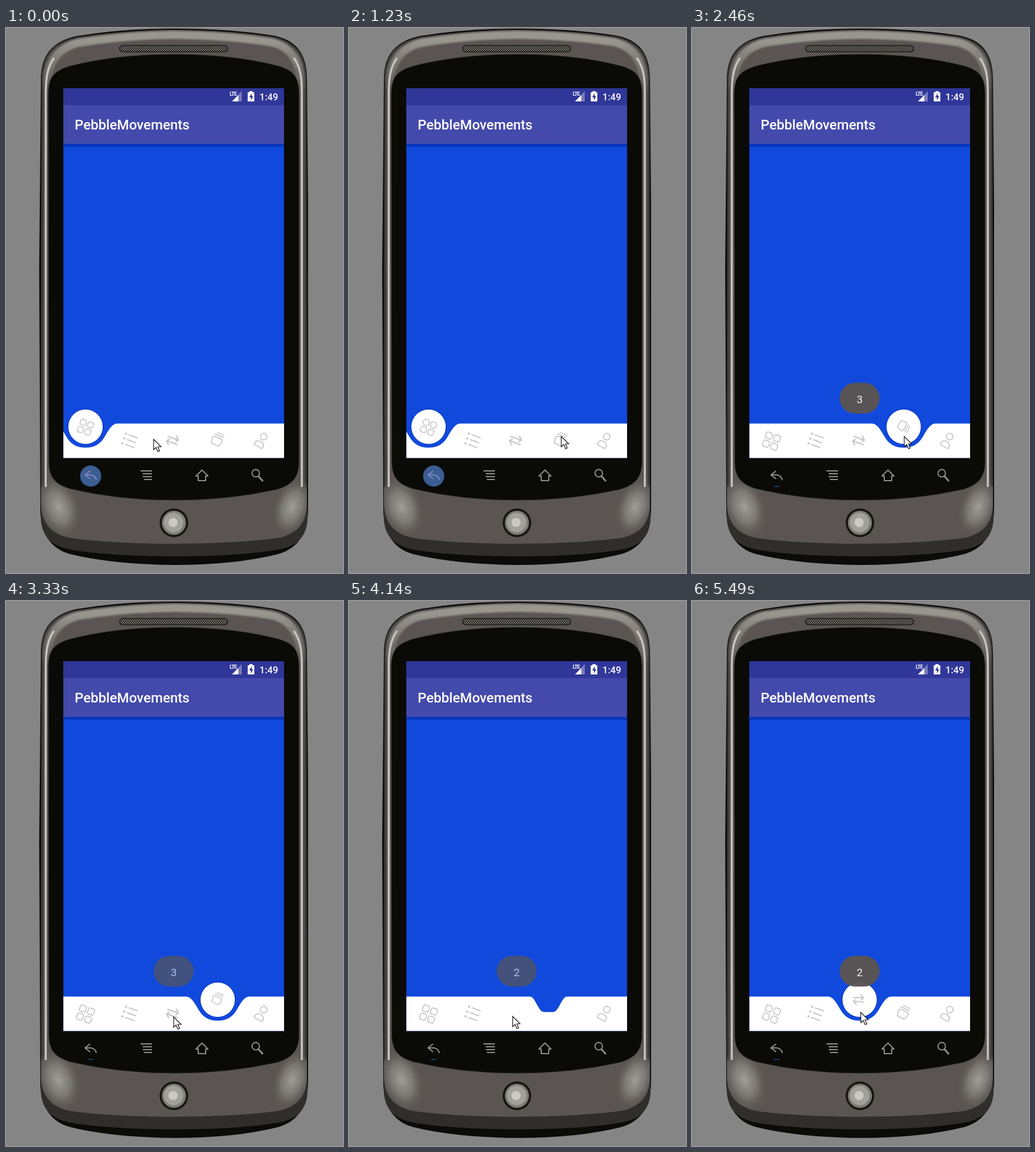
Write an HTML page that moves like this. It is 589 px wide and 950 px high and loops after 5.52 s.

```html
<!DOCTYPE html>
<html lang="en">
<head>
<meta charset="utf-8">
<title>Sliding notch menu</title>
<style>
html, body { margin: 0; width: 100%; height: 100%; overflow: hidden; background: #858585; }
svg { display: block; width: 589px; height: 950px; font-family: Roboto, sans-serif; }
.line { fill: none; stroke: #c9c9c9; stroke-width: 1.9; stroke-linecap: round; stroke-linejoin: round; }
.key { fill: none; stroke: #918f8a; stroke-width: 2; stroke-linejoin: round; }
</style>
</head>
<body>
<svg viewBox="0 0 589 950">
  <defs>
    <radialGradient id="shine">
      <stop offset="0" stop-color="#a19f99"/>
      <stop offset=".5" stop-color="#8a8883" stop-opacity=".7"/>
      <stop offset="1" stop-color="#5a5552" stop-opacity="0"/>
    </radialGradient>
    <linearGradient id="topLight" x1="0" y1="0" x2="0" y2="110" gradientUnits="userSpaceOnUse">
      <stop offset=".2" stop-color="#98968f"/>
      <stop offset="1" stop-color="#98968f" stop-opacity="0"/>
    </linearGradient>
    <filter id="soft" x="-10%" y="-10%" width="120%" height="120%"><feGaussianBlur stdDeviation="1.500"/></filter>
    <pattern id="mesh" width="4" height="4" patternUnits="userSpaceOnUse">
      <rect width="4" height="4" fill="#22211e"/>
      <path d="M0 0h2v2H0zM2 2h2v2H2z" fill="#77746f"/>
    </pattern>
    <clipPath id="body"><path d="M62 90C62 48 82 24 124 16Q205 4 294 3Q390 4 466 15C508 23 525 48 525 90L526 830C526 862 510 882 476 889Q400 899 294 899Q184 899 112 889C78 882 62 862 61 830Z"/></clipPath>
    <clipPath id="screen"><rect x="100.300" y="105" width="385.700" height="644.500"/></clipPath>
  </defs>

  <!-- phone -->
  <path d="M61 90C61 46 82 23 124 14Q205 1 294 1Q390 1 466 13C509 21 526 46 526 90L528 310V840C527 880 512 906 476 917Q400 936 294 936Q186 935 112 917C78 908 60 880 60 840L58 420Z" fill="#0b0b08"/>
  <path d="M61 830C62 862 78 882 112 889Q184 899 294 899Q400 899 476 889C510 882 526 862 527 830V858C524 889 508 904 472 910Q400 921 294 921Q190 921 116 910C80 903 64 888 61 858Z" fill="#302e2b"/>
  <g clip-path="url(#body)">
    <rect x="58" width="470" height="900" fill="#5a5552"/>
    <g fill="none" filter="url(#soft)">
      <path d="M62 800V90C62 48 82 24 124 16Q205 4 294 3Q390 4 466 15C508 23 525 48 525 90V800" stroke="#33312e" stroke-width="5"/>
      <path d="M71 110C71 62 88 36 126 26Q205 13 294 12Q390 13 464 25C500 34 516 60 516 110" stroke="url(#topLight)" stroke-width="14"/>
    </g>
    <ellipse cx="92" cy="835" rx="38" ry="58" fill="url(#shine)" transform="rotate(-20 92 835)"/>
    <ellipse cx="500" cy="835" rx="34" ry="54" fill="url(#shine)" transform="rotate(20 500 835)"/>
    <path d="M69.500 800V110C70 82 74 66 84 52M517 800V110C517 82 513 66 503 52" fill="none" stroke="#c8c6c1" stroke-width="3.500"/>
  </g>
  <path d="M74 120C74 88 80 77 110 67Q190 46 294 46Q400 46 478 67C506 76 512 88 512 120V758C511 784 500 796 474 804Q390 823 294 823Q196 823 112 803C86 795 76 784 75 758Z" fill="#0a0a07" stroke="#23221f"/>
  <rect x="198.500" y="30.500" width="189" height="11" rx="5.500" fill="url(#mesh)" stroke="#1b1a17" stroke-width="1.500"/>
  <circle cx="293.500" cy="862.500" r="25" fill="#171612"/>
  <circle cx="293.500" cy="862.500" r="21" fill="#7f7d78"/>
  <circle cx="293" cy="862" r="17" fill="#a2a09b"/>
  <circle cx="292" cy="862" r="8" fill="#cbc9c5"/>

  <!-- keys under the screen -->
  <circle id="press" cx="148" cy="781" r="18.500" fill="#3b5d91"/>
  <path id="glow" d="M143 799H153" stroke="#1d4f86" stroke-width="1.500"/>
  <path id="back" class="key" d="M147 772L138 779L147 786M139 779H148Q156 780 158 788"/>
  <path class="key" d="M235 772H255M239 777H255M239 782H255M241 787H255"/>
  <path class="key" d="M332 781L342.500 770.500L353 781H349V789H336V781Z"/>
  <g class="key"><circle cx="436.500" cy="776" r="6.500"/><path d="M441 781L449 790" stroke-width="3"/></g>

  <!-- screen -->
  <g clip-path="url(#screen)">
    <rect x="100" y="105" width="386" height="645" fill="#1149dd"/>
    <rect x="100" y="201" width="386" height="6" fill="#0736bb"/>
    <rect x="100" y="134" width="386" height="68" fill="#434aab"/>
    <rect x="100" y="105" width="386" height="29.500" fill="#303799"/>
    <g fill="#fff">
      <text x="391" y="118" font-size="9" font-weight="700" letter-spacing="-.9">LTE</text>
      <path d="M412 110V128H395Z" opacity=".35"/>
      <path d="M406 117V128H395Z"/>
      <path d="M425.500 110H431V112H434V128H422.500V112H425.500Z"/>
      <path d="M429.500 113.500L425 121H428V126.500L432 119H429.500Z" fill="#303799"/>
      <text x="443" y="126" font-size="16.500" font-weight="500">1:49</text>
      <text x="120" y="177" font-size="24" font-weight="500">PebbleMovements</text>
    </g>
    <path id="bar" fill="#fff"/>
    <g id="ball">
      <circle cy="695" r="31.500" fill="#0c3cc6"/>
      <circle cy="695" r="30" fill="#fff"/>
    </g>
    <g id="icons">
      <g class="line">
        <rect x="-13" y="-13" width="11" height="11" rx="3"/>
        <rect x="2" y="-13" width="11" height="11" rx="3"/>
        <rect x="-13" y="2" width="11" height="11" rx="3"/>
        <rect x="2" y="2" width="11" height="11" rx="3"/>
      </g>
      <g class="line">
        <path d="M-10 -9h.1M-10 0h.1M-10 9h.1" stroke-width="4"/>
        <path d="M-4 -9H11M-4 0H11M-4 9H11" stroke-width="2.200"/>
      </g>
      <path class="line" stroke-linecap="butt" style="stroke-width:2.400" d="M-10 -4H9M4 -9.500L9.500 -4L6 0M10 4H-9M-4 9.500L-9.500 4L-6 0"/>
      <path class="line" d="M-6 -4H6Q9 -4 9 -1L8 6Q8 9 5 9H-5Q-8 9 -8 6L-9 -1Q-9 -4 -6 -4ZM-8 -8H8M-5 -12H8"/>
      <g class="line"><circle cy="-9" r="5.700"/><path d="M-8 9Q-8 1 0 1Q8 1 8 9Q8 11 6 11H-6Q-8 11 -8 9Z"/></g>
    </g>
    <g id="toast">
      <rect x="258" y="618.500" width="70" height="53.500" rx="26.700" fill="#5a5552" fill-opacity=".97"/>
      <text id="number" x="293" y="654" font-size="19" text-anchor="middle" fill="#f2f2f2"></text>
    </g>
  </g>
  <path id="cursor" d="M0 0V18L4.200 14L7.500 21.500L10.500 20.200L7.300 13H13Z" fill="#fff" stroke="#111" stroke-width="1.200"/>
</svg>
<script>
const LOOP = 5520;
const SINK = 145, SLIDE = 400, RISE = 190;
const TOP = 689.5, DROP = 55;
const taps = [{ at: 1395, from: 0, to: 3 }, { at: 3855, from: 3, to: 2 }];
const tilts = [20, 20, 20, 25, 30];
const centers = [[139, 720], [216, 719], [291, 719], [369, 718], [446, 720]];
// time, x, y
const mouse = [[0, 258, 717], [300, 258, 717], [1080, 371, 712], [2700, 371, 712],
  [3260, 293, 725], [3700, 293, 725], [4100, 286, 724], [4600, 286, 724], [5400, 295, 717]];

const $ = id => document.getElementById(id);
const icons = [...$('icons').children];
const clamp = v => Math.min(1, Math.max(0, v));
const lerp = (a, b, k) => a + (b - a) * k;
const smooth = v => (1 - Math.cos(Math.PI * clamp(v))) / 2;
const show = (id, on) => $(id).setAttribute('visibility', on ? 'visible' : 'hidden');

function barPath(x, open) {
  const w = lerp(33, 56, open), d = lerp(27, 42, open), f = lerp(7, 0, open) / w;
  const p = (u, v) => `${(x + u * w).toFixed(2)} ${(TOP + v * d).toFixed(2)}`;
  return `M40 ${TOP}L${p(-1, 0)}C${p(-.84, 0)} ${p(-.76, .18)} ${p(-.6, .54)}` +
    `C${p(-.46, .86)} ${p(-.27 - f / 2, 1)} ${p(-f, 1)}L${p(f, 1)}` +
    `C${p(.27 + f / 2, 1)} ${p(.46, .86)} ${p(.6, .54)}` +
    `C${p(.76, .18)} ${p(.84, 0)} ${p(1, 0)}H486V750H40Z`;
}

function pointer(t) {
  const i = mouse.findLastIndex(m => m[0] <= t);
  const a = mouse[i], b = mouse[i + 1] || a;
  const k = a === b ? 0 : smooth((t - a[0]) / (b[0] - a[0]));
  return `translate(${lerp(a[1], b[1], k)} ${lerp(a[2], b[2], k)})`;
}

function draw(t) {
  const tap = taps.findLast(item => item.at <= t);
  const age = tap ? t - tap.at : 0;
  const slide = smooth((age - SINK) / SLIDE);
  const pos = tap ? lerp(tap.from, tap.to, slide) : 0;
  const rise = smooth((age - SINK - SLIDE) / RISE);
  const open = tap ? (age < SINK ? 1 - smooth(age / SINK) : rise) : 1;
  const spin = tap ? 360 * smooth((age - 690) / 1100) : 0;
  const x = 139 + 77 * pos, drop = DROP * (1 - open);

  $('bar').setAttribute('d', barPath(x, open));
  $('ball').setAttribute('transform', `translate(${x} ${drop})`);
  $('ball').firstElementChild.setAttribute('opacity', clamp(open * 3 - 2));
  show('ball', open > 0);

  icons.forEach((icon, i) => {
    const near = Math.abs(pos - i) < 1;
    const [cx, cy] = centers[i];
    const y = near ? cy - 24 + drop : cy;
    const turn = tilts[i] + (near ? spin : 0);
    icon.setAttribute('transform', `translate(${cx} ${y}) rotate(${turn}) scale(${near ? .9 : 1})`);
    icon.setAttribute('opacity', near ? open : 1);
  });

  const shown = tap ? clamp((age - 185) / 140) * clamp((2035 - age) / 140) : 0;
  $('toast').setAttribute('opacity', shown);
  $('number').textContent = tap ? tap.to : '';
  show('press', !tap);
  show('glow', tap);
  $('back').style.stroke = tap ? '' : '#8088c0';
  $('cursor').setAttribute('transform', pointer(t));
}

const start = performance.now();
function tick() {
  draw((performance.now() - start) % LOOP);
  requestAnimationFrame(tick);
}
tick();
</script>
</body>
</html>
```
